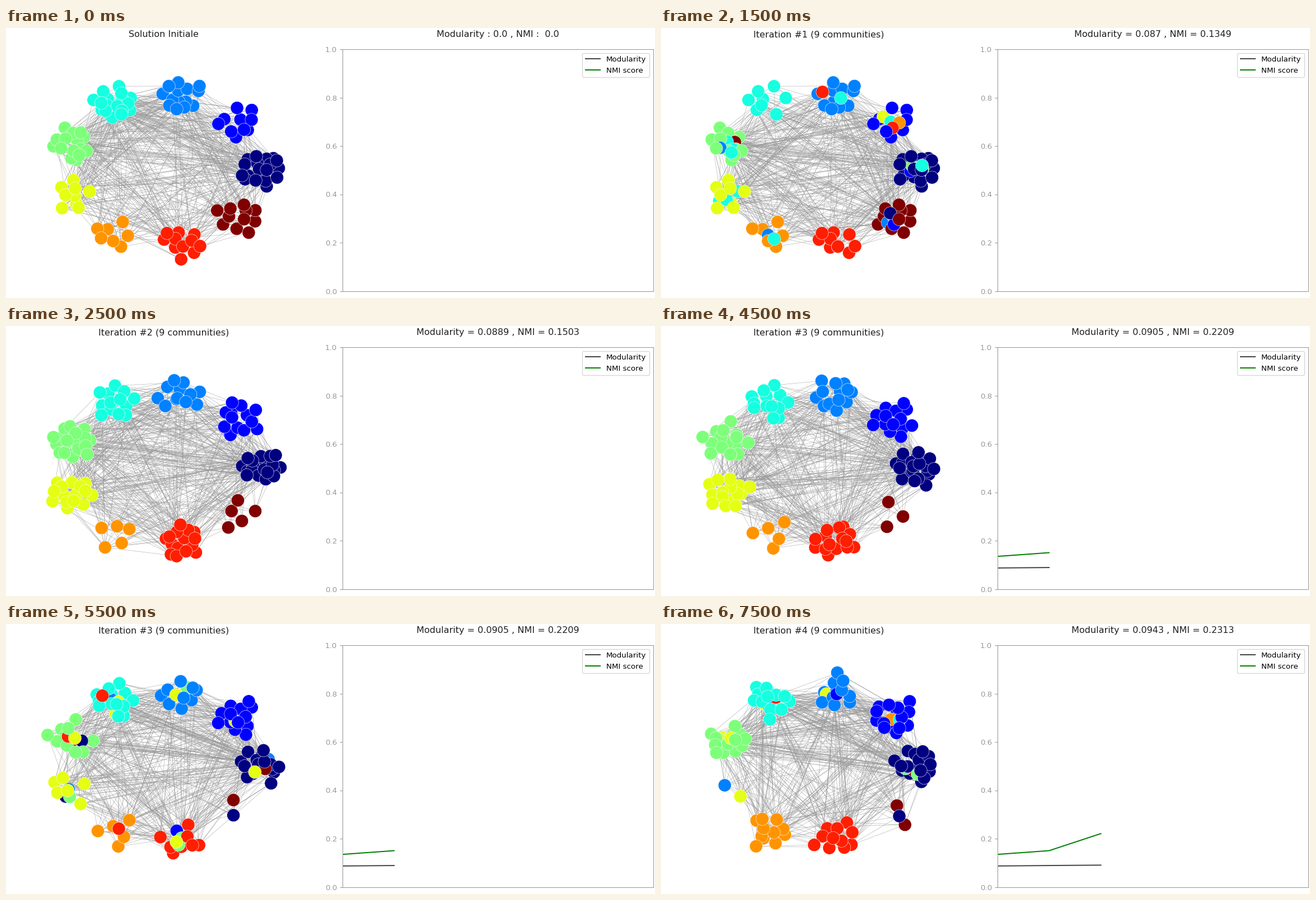
Animation, 1159 px wide and 483 px high, one loop 8 s. Source, as a matplotlib script:

```python
import matplotlib.pyplot as plt
import numpy as np
from matplotlib.animation import FuncAnimation
from matplotlib.collections import LineCollection

W, H, DPI = 1159, 483, 96
COMMUNITIES, NODES, EDGES = 9, 115, 613
GOLDEN_ANGLE = np.pi * (3 - np.sqrt(5))
GREY = "#999999"
PALETTE = plt.cm.jet(np.linspace(0, 1, COMMUNITIES))

MODULARITY = [0.087, 0.0889, 0.0905, 0.0943]
NMI = [0.1349, 0.1503, 0.2209, 0.2313]

# Community sizes at the start of each iteration, and how many nodes then leave.
SIZES = [[20, 10, 14, 18, 15, 9, 7, 11, 11],
         [19, 13, 12, 13, 18, 15, 5, 15, 5],
         [22, 14, 13, 13, 15, 15, 5, 15, 3],
         [18, 17, 13, 15, 17, 8, 12, 12, 3]]
LEAVERS = [[2, 2, 3, 10, 3, 1, 1, 2, 1],
           [3, 2, 3, 3, 4, 3, 1, 4, 2],
           [4, 1, 4, 0, 4, 9, 0, 7, 2],
           [2, 2, 2, 2, 2, 7, 1, 1, 1]]

# Community centres are evenly spaced on an ellipse, anticlockwise from the right.
turn = np.linspace(0, 2 * np.pi, COMMUNITIES, endpoint=False)
CENTRES = np.column_stack([282 + 174 * np.cos(turn), 253 - 134 * np.sin(turn)])
SPREAD = np.array([38, 31])


def disc(count, rng):
    """Points spread evenly over a unit disc, slightly shaken."""
    i = np.arange(count)
    angle = rng.uniform(0, 2 * np.pi) + GOLDEN_ANGLE * i
    radius = np.sqrt((i + 0.5) / count)
    points = radius[:, None] * np.column_stack([np.cos(angle), np.sin(angle)])
    return points + rng.normal(0, 0.1, (count, 2))


def make_layout(sizes, leavers, seed):
    """Community, home place, later place and early-mover flag of every node."""
    rng = np.random.default_rng(seed)
    community = rng.permutation(np.repeat(np.arange(COMMUNITIES), sizes))
    home = np.zeros((NODES, 2))
    early = np.zeros((NODES, 1), bool)
    for k in range(COMMUNITIES):
        members = rng.permutation(np.flatnonzero(community == k))
        home[members] = CENTRES[k] + SPREAD * disc(len(members), rng)

    away = home.copy()
    for k, count in enumerate(leavers):
        leaving = rng.choice(np.flatnonzero(community == k), count, replace=False)
        weights = np.array(sizes, float)
        weights[k] = 0
        goal = rng.choice(COMMUNITIES, count, p=weights / weights.sum())
        away[leaving] = CENTRES[goal] + SPREAD * rng.normal(0, 0.25, (count, 2))
        early[leaving[::2]] = True
    return community, home, away, early


layouts = [make_layout(s, m, seed) for seed, (s, m) in enumerate(zip(SIZES, LEAVERS))]

edge_rng = np.random.default_rng(7)
start = edge_rng.integers(0, NODES, EDGES)
end = (start + edge_rng.integers(1, NODES, EDGES)) % NODES
edges = np.column_stack([start, end])

fig = plt.figure(figsize=(W / DPI, H / DPI), dpi=DPI, facecolor="white")

graph = fig.add_axes([0, 0, 1, 1])
graph.set(xlim=(0, W), ylim=(H, 0))
graph.axis("off")
links = LineCollection([], colors=GREY, linewidths=0.35, zorder=1)
graph.add_collection(links)
dots = graph.scatter([], [], s=300, edgecolors="white", linewidths=0.4, zorder=2)
title_style = dict(size=12, color="#1f1f1f", ha="center", va="baseline")
graph_title = graph.text(281.3, 16.4, "", **title_style)
score_title = graph.text(878, 16.4, "", **title_style)

left, right, top, bottom = 600.5, 1155.5, 38, 470.5
chart = fig.add_axes([left / W, 1 - bottom / H, (right - left) / W, (bottom - top) / H])
chart.set(xlim=(0, 6), ylim=(0, 1), xticks=[])
chart.tick_params(axis="y", color=GREY, labelcolor=GREY, labelsize=10)
for spine in chart.spines.values():
    spine.set_color(GREY)
modularity_line, = chart.plot([], [], color="#444444", lw=1.5, label="Modularity")
nmi_line, = chart.plot([], [], color="green", lw=1.5, label="NMI score")
chart.legend(loc="upper right", fontsize=10)


def update(frame):
    # Step 0 is the start; step 1 moves half the leavers. After that, odd steps
    # open a new layout and even steps show it with every leaver moved.
    step = (frame + 1) // 2
    iteration = (step + 1) // 2
    index = max(iteration - 1, 0)
    community, home, away, early = layouts[index]
    if step == 1:
        points = np.where(early, away, home)
    else:
        points = away if step > 0 and step % 2 == 0 else home
    links.set_segments(points[edges])
    dots.set_offsets(points)
    dots.set_facecolors(PALETTE[community])

    if iteration == 0:
        graph_title.set_text("Solution Initiale")
        score_title.set_text("Modularity : 0.0 , NMI :  0.0")
    else:
        graph_title.set_text(f"Iteration #{iteration} (9 communities)")
        score_title.set_text(f"Modularity = {MODULARITY[index]} , NMI = {NMI[index]}")
    modularity_line.set_data(range(index), MODULARITY[:index])
    nmi_line.set_data(range(index), NMI[:index])
    return links, dots, graph_title, score_title, modularity_line, nmi_line


anim = FuncAnimation(fig, update, frames=16, interval=500, repeat=True, repeat_delay=0)
plt.show()
```
